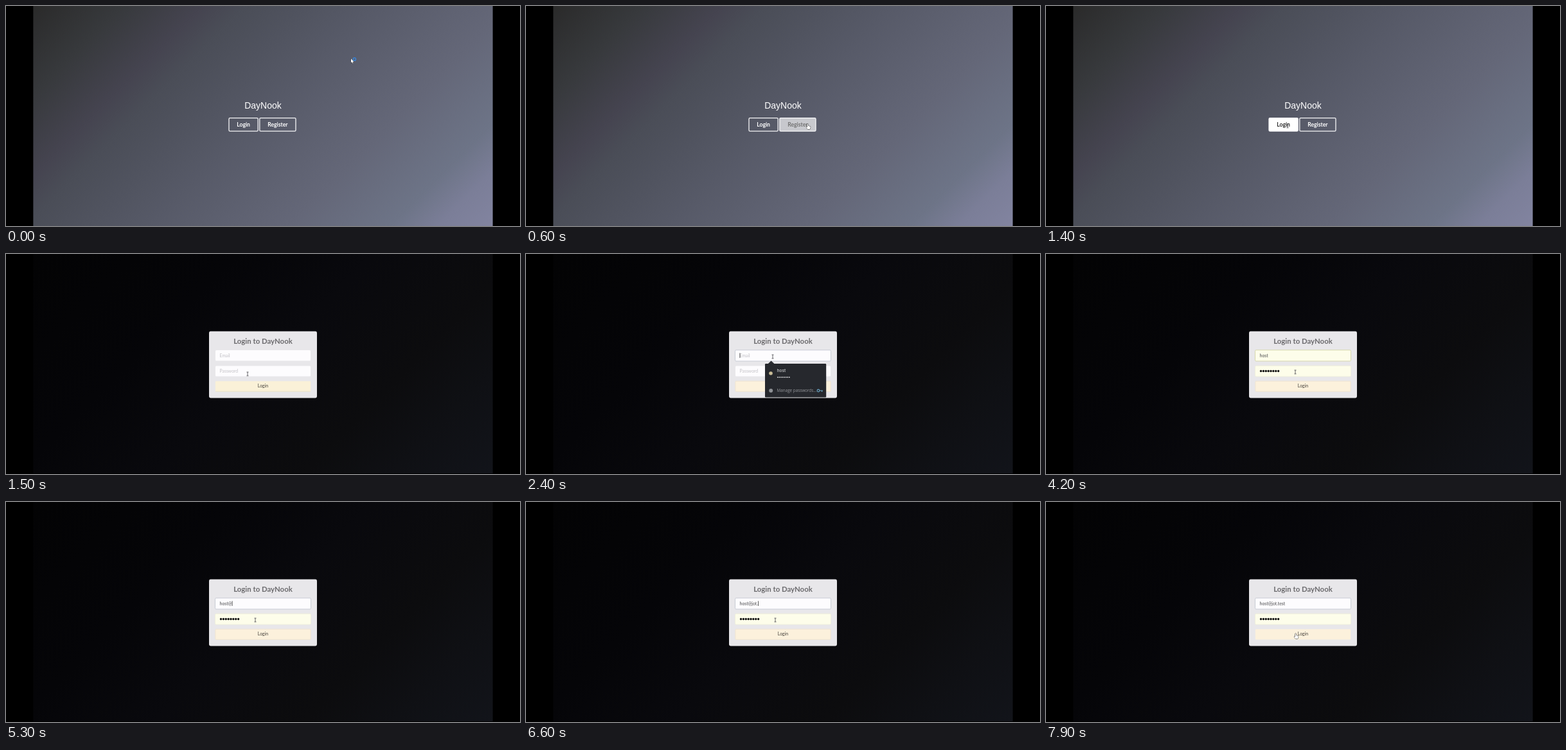
Recreate the animation shown at these times as an HTML page with a canvas. Size 800 px wide and 343 px high, loop 8 s.

```html
<!DOCTYPE html>
<html lang="en">
<head>
<meta charset="utf-8">
<title>Login flow</title>
<style>
html, body { margin: 0; width: 100%; height: 100%; overflow: hidden; background: #000; }
canvas { display: block; width: 800px; height: 343px; }
</style>
</head>
<body>
<canvas id="stage" width="800" height="343"></canvas>
<script>
const ctx = document.getElementById('stage').getContext('2d');
const LOOP = 8000, STEP = 100;
const APP = 'DayNook', NAME = 'host', EMAIL = 'host@jot.test';
const LATO = 'Lato, sans-serif', ARIAL = '"Liberation Sans", sans-serif';

// Time at which each character after the name is typed
const KEYS = [5300, 5800, 6000, 6200, 6400, 6700, 6700, 6800, 6900];
// Pointer path: time, x, y
const PATH = [
  [0, 537, 82], [100, 534, 86], [350, 480, 142], [600, 438, 184],
  [900, 376, 186], [1500, 376, 187], [1700, 378, 183], [2200, 384, 160],
  [2700, 384, 160], [3200, 387, 183], [3500, 388, 184], [7200, 388, 184],
  [7700, 388, 205], [7900, 388, 205]
];

const clamp = v => Math.max(0, Math.min(1, v));
const ease = v => v * v * (3 - 2 * v);

function pointerAt(t) {
  const i = PATH.findIndex(p => p[0] > t);
  if (i < 0) return PATH[PATH.length - 1].slice(1);
  const [t0, x0, y0] = PATH[i - 1], [t1, x1, y1] = PATH[i];
  const k = ease((t - t0) / (t1 - t0));
  return [x0 + (x1 - x0) * k, y0 + (y1 - y0) * k];
}

function diagonal(stops) {
  // 135 degree gradient over the 716 x 343 page
  const h = 1059 / 4;
  const g = ctx.createLinearGradient(400 - h, 171.5 - h, 400 + h, 171.5 + h);
  stops.forEach(([at, color]) => g.addColorStop(at, color));
  return g;
}

const pageFill = diagonal([
  [0, '#2a2a2a'], [.13, '#37393c'], [.25, '#454450'], [.31, '#4a4d57'],
  [.5, '#575a68'], [.7, '#646778'], [.85, '#6d7487'], [.92, '#7b7e98'], [1, '#8284a0']
]);
const dimFill = diagonal([
  [0, '#030304'], [.3, '#050508'], [.5, '#09090d'], [.72, '#0c0c0e'], [.85, '#0f1014'], [1, '#12141a']
]);

function box(x0, y0, x1, y1, r, fill, stroke, width = 1) {
  ctx.beginPath();
  ctx.roundRect(x0, y0, x1 - x0, y1 - y0, r);
  if (fill) { ctx.fillStyle = fill; ctx.fill(); }
  if (stroke) { ctx.strokeStyle = stroke; ctx.lineWidth = width; ctx.stroke(); }
}

function text(str, x, y, font, color, align = 'left') {
  ctx.font = font;
  ctx.fillStyle = color;
  ctx.textAlign = align;
  ctx.fillText(str, x, y);
}

function disc(x, y, r, color) {
  ctx.beginPath();
  ctx.arc(x, y, r, 0, Math.PI * 2);
  ctx.fillStyle = color;
  ctx.fill();
}

function shape(points, fill, stroke, width = .7) {
  ctx.beginPath();
  points.forEach(([x, y]) => ctx.lineTo(x, y));
  ctx.closePath();
  if (stroke) { ctx.strokeStyle = stroke; ctx.lineWidth = width; ctx.stroke(); }
  ctx.fillStyle = fill;
  ctx.fill();
}

function dots(x, y, gap, r, color) {
  for (let i = 0; i < 8; i++) disc(x + i * gap, y, r, color);
}

const cursors = {
  arrow() {
    shape([[0, 0], [0, 6.6], [1.5, 5.3], [2.5, 7.4], [3.5, 6.9], [2.6, 4.9], [4.5, 4.7]], '#fff', '#222');
  },
  busy() {
    cursors.arrow();
    ctx.beginPath();
    ctx.arc(5.4, .9, 2.1, 0, Math.PI * 2);
    ctx.strokeStyle = '#3b82d0';
    ctx.lineWidth = 1.5;
    ctx.stroke();
  },
  beam() {
    ctx.beginPath();
    for (const y of [-2.9, 2.9]) { ctx.moveTo(-1.5, y); ctx.lineTo(1.5, y); }
    ctx.moveTo(0, -2.9);
    ctx.lineTo(0, 2.9);
    ctx.strokeStyle = '#55555a';
    ctx.lineWidth = .9;
    ctx.stroke();
  },
  hand() {
    shape([[0, 0], [1.2, 0], [1.3, 3], [4.6, 3.7], [4.7, 6], [3.9, 8], [.4, 8], [-2, 5], [-1.4, 4.3], [0, 5.2]],
      '#fff', '#333', 1);
  }
};

function drawCursor(t, x, y) {
  let kind = 'beam';
  if (t < 600) kind = 'busy';
  else if (t < 1400 || y > 197) kind = 'hand';
  else if (t >= 2900 && t < 3500) kind = 'busy';
  ctx.save();
  ctx.translate(x, y);
  cursors[kind]();
  ctx.restore();
}

function landingButton(label, x0, x1, hover) {
  box(x0, 174.6, x1, 195.2, 1.6, `rgba(255,255,255,${hover})`, '#f6f6f8', 1.3);
  const c = Math.round(255 - 210 * hover);
  text(label, (x0 + x1) / 2, 187.8, `bold 8.6px ${LATO}`, `rgb(${c},${c},${c})`, 'center');
}

function drawLanding(t) {
  ctx.fillStyle = pageFill;
  ctx.fillRect(42.4, 0, 715.2, 343);
  text(APP, 400, 160.2, `14px ${ARIAL}`, '#fff', 'center');
  landingButton('Login', 347, 392.2, clamp((t - 700) / 200));
  landingButton('Register', 394.8, 451, clamp((t - 500) / 150) * clamp((1100 - t) / 300));
}

function drawForm(t, overLogin) {
  const preview = t >= 3000 && t < 3500;
  const filled = t >= 3500;
  const typing = t >= 5100;
  const font = `6.8px ${LATO}`;

  box(316, 120.6, 484, 224.4, 2.4, '#e8e7ea');
  text(`Login to ${APP}`, 400, 140, `bold 11.4px ${LATO}`, '#6c6b6e', 'center');

  // Email
  const yellow = (preview || filled) && !typing;
  const focus = t >= 2300;
  box(focus ? 325.5 : 326, focus ? 149.8 : 150, focus ? 474.5 : 474, focus ? 167 : 166.6, 1.6,
    yellow ? '#fdfdea' : '#fdfcfe', yellow ? '#d3d4a6' : focus ? '#c3c8d2' : null, .9);
  const typed = typing ? EMAIL.slice(0, NAME.length + KEYS.filter(k => k <= t).length) : NAME;
  const hasText = preview || filled;
  text(hasText ? typed : 'Email', 332.6, 160.6, font, hasText ? '#48484a' : '#c3c1c6');
  const caretOn = (t >= 2300 && t < 3500) || (t >= 4600 && t < 7100);
  if (caretOn) {
    const end = filled ? ctx.measureText(typed).width + .5 : 0;
    ctx.fillStyle = '#333';
    ctx.fillRect(332.5 + end, 154.4, .8, 7.6);
  }

  // Password
  if (hasText) {
    box(325.5, 174.2, 474.5, 191, 1.6, '#fdfdea', '#eeeed8', .8);
    if (filled) dots(334.5, 182.5, 3.88, 1.65, '#111');
    else dots(333.7, 182.4, 2.3, .95, '#222');
  } else {
    box(326, 174.4, 474, 190.8, 1.6, '#fdfcfe');
    text('Password', 332.6, 184.8, font, '#c3c1c6');
  }

  // Submit
  const edge = overLogin || !focus ? null : '#eee3ce';
  box(325.8, 198.2, 474.2, 214.4, 1.2, focus ? '#fcf1dc' : '#faf1d8', edge, .8);
  if (!focus) {
    ctx.fillStyle = '#e6dfc6';
    ctx.fillRect(326, 213.8, 148, .8);
  }
  text('Login', 400, 208.4, `6.9px ${LATO}`, '#45423c', 'center');
}

function drawSuggestions(active) {
  shape([[375.8, 172], [381.6, 166.6], [387.4, 172]], '#292b30');
  box(372, 171, 467.2, 223.4, 1.2, '#26282d');
  if (active) {
    ctx.fillStyle = '#3f4146';
    ctx.fillRect(372.4, 172, 94.4, 28.4);
  }
  disc(381, 186, 2.8, '#c9bd98');
  text(NAME, 390.8, 184.3, '6.8px Roboto, sans-serif', '#dadbdd');
  dots(391.8, 192.2, 2.58, .85, '#e4e4e6');
  disc(381.2, 213, 3, '#8d9094');
  text('Manage passwords...', 390.6, 215.3, '6.3px "Open Sans", sans-serif', '#96989c');
  ctx.beginPath();
  ctx.arc(455, 213, 1.9, 0, Math.PI * 2);
  ctx.moveTo(457, 213);
  ctx.lineTo(462, 213);
  ctx.moveTo(460.6, 213);
  ctx.lineTo(460.6, 215);
  ctx.strokeStyle = '#6ba6c4';
  ctx.lineWidth = 1.1;
  ctx.stroke();
}

function draw(t) {
  const [x, y] = pointerAt(t);
  ctx.fillStyle = '#000';
  ctx.fillRect(0, 0, 800, 343);
  if (t < 1500) {
    drawLanding(t);
  } else {
    ctx.fillStyle = dimFill;
    ctx.fillRect(42.4, 0, 715.2, 342);
    drawForm(t, t > 7200 && y > 197);
    if (t >= 2400 && t < 3500) drawSuggestions(t >= 3000);
  }
  drawCursor(t, x, y);
}

function tick(now) {
  draw(Math.floor((now % LOOP) / STEP) * STEP);
  requestAnimationFrame(tick);
}
draw(0);
requestAnimationFrame(tick);
</script>
</body>
</html>
```
